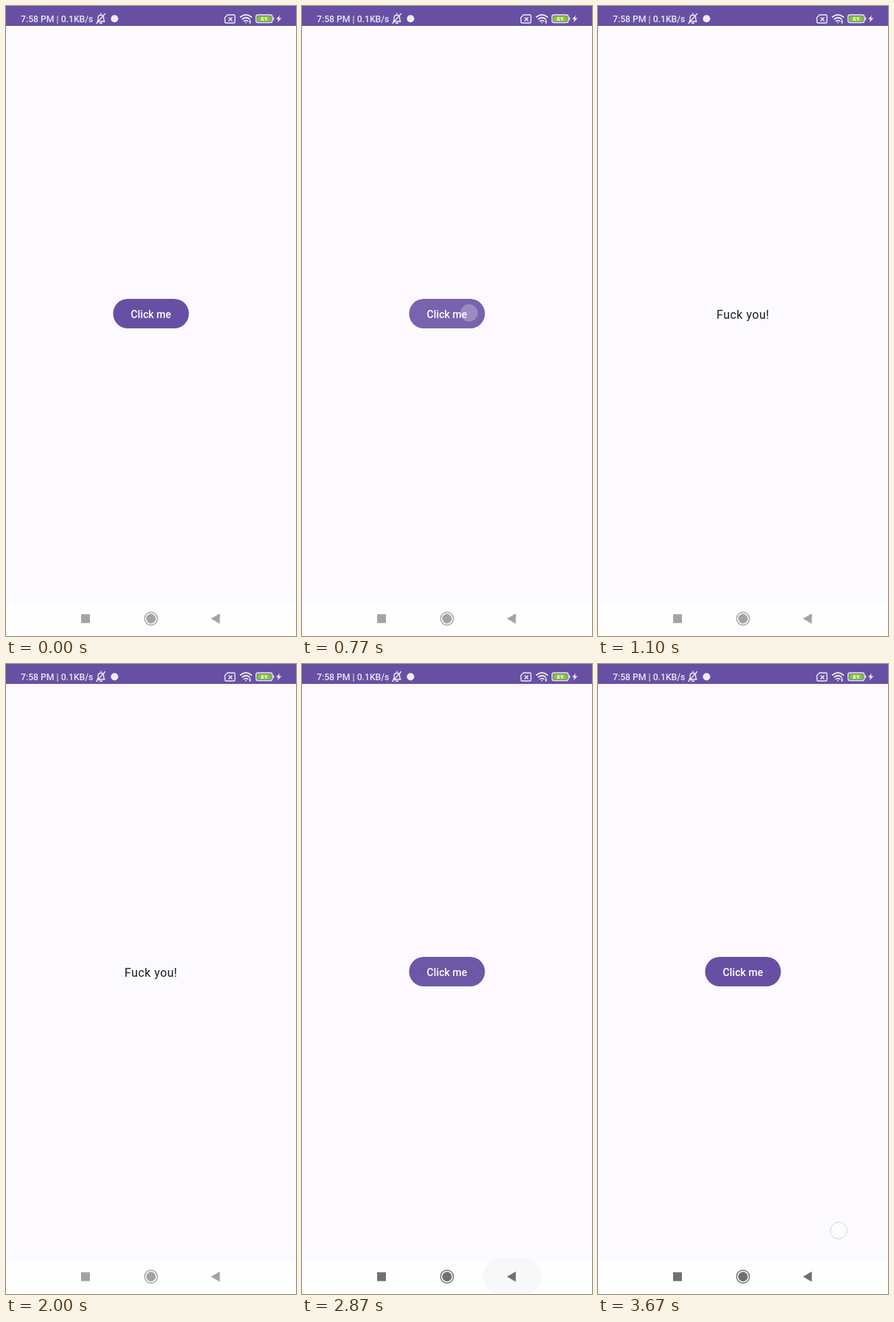
An HTML page that plays this animation: 394x854 px, repeating every 3.71 s.

```html
<!DOCTYPE html>
<html lang="en">
<head>
<meta charset="utf-8">
<style>
  html, body { margin: 0; width: 100%; height: 100%; overflow: hidden; background: #fcfafe; }
  svg { display: block; width: 394px; height: 854px; font-family: Roboto, sans-serif; }
</style>
</head>
<body>
<svg viewBox="0 0 394 854">
  <defs>
    <clipPath id="pill"><rect x="145.5" y="397" width="103" height="40" rx="20"/></clipPath>
  </defs>
  <rect width="394" height="854" fill="#fcfafe"/>
  <rect y="808" width="394" height="46" fill="#fefefe"/>

  <!-- status bar -->
  <rect width="394" height="27" fill="#6750a4"/>
  <g fill="none" stroke="#efecf6" stroke-width="1.4" stroke-linecap="round" stroke-linejoin="round">
    <text x="20" y="21.7" font-size="12.2" font-weight="500" fill="#e9e5f2" stroke="none">7:58 PM | 0.1KB/s</text>
    <path d="M124 21H134C132 19 133 17 132.5 15A3.8 3.8 0 0 0 125.2 15C125 17 126 19 124 21M127.5 23.3H130.5M129 11V10M134.5 10.5L123 23.5"/>
    <circle cx="147.5" cy="17.3" r="5" fill="#efecf6" stroke="none"/>
    <path d="M301 12H309.5Q311 12 311 13.5V21.5Q311 23 309.5 23H299Q297.5 23 297.5 21.5V15.5ZM302.8 15.8L307 20M307 15.8L302.8 20"/>
    <path d="M318.5 15Q326 8.8 333.5 15M321 17.8Q326 13.7 331 17.8M323.5 20.4Q326 18.6 328.5 20.4" stroke-width="1.7"/>
    <path d="M326 22.5V22.6M331.5 20V23" stroke-width="1.8"/>
    <rect x="339.7" y="12" width="22" height="10.5" rx="2.5"/>
    <rect x="341.3" y="13.6" width="18.8" height="7.3" rx="1" fill="#83c72f" stroke="none"/>
    <path d="M363.5 15.8V18.7"/>
    <text x="350.7" y="20.2" font-size="8" font-weight="700" text-anchor="middle" fill="#f8f8f4" stroke="none">89</text>
    <path d="M372 12.5L367 18H370L368.8 22.3L374.3 16.5H371Z" fill="#efecf6" stroke="none"/>
  </g>

  <!-- screens -->
  <g id="button" clip-path="url(#pill)">
    <rect x="145" y="397" width="104" height="40" fill="#6750a4"/>
    <circle id="ripple" cx="227" cy="416" fill="#fff"/>
    <text x="197" y="422.6" font-size="14" font-weight="500" letter-spacing=".1" text-anchor="middle" fill="#fff">Click me</text>
  </g>
  <text id="reply" x="161" y="424" font-size="16" letter-spacing=".5" fill="#1c1b1f">Fuck you!</text>

  <!-- navigation bar -->
  <rect id="backGlow" x="246" y="806" width="79.5" height="48" rx="24" fill="#eeeff2"/>
  <g id="nav">
    <rect x="102" y="824.5" width="12" height="12"/>
    <circle cx="197" cy="830.5" r="6.5"/>
    <circle cx="197" cy="830.5" r="8.7" fill="none" stroke-width="1.4" id="ring"/>
    <path d="M278.5 830.5L290.5 823.5V837.5Z"/>
  </g>
  <circle id="touch" r="11.3" fill="#fff" fill-opacity=".25" stroke="#d4d4dc"/>
</svg>
<script>
const LOOP = 3710;
const el = id => document.getElementById(id);
const set = (id, attrs) => { for (const k in attrs) el(id).setAttribute(k, attrs[k]); };
const ramp = (t, from, to) => Math.min(1, Math.max(0, (t - from) / (to - from)));
const mix = (a, b, p) => a + (b - a) * p;

// cubic-bezier(.4, 0, .2, 1)
function ease(x) {
  let lo = 0, hi = 1, s = 0.5;
  for (let i = 0; i < 20; i++) {
    s = (lo + hi) / 2;
    const bx = 1.2 * s * (1 - s) ** 2 + 0.6 * s * s * (1 - s) + s ** 3;
    if (bx < x) lo = s; else hi = s;
  }
  return s * s * (3 - 2 * s);
}

function draw(t) {
  const leave = ease(ramp(t, 780, 1080));
  const back = ease(ramp(t, 2648, 2948));
  const home = t < 2000 ? 1 - leave : back;
  set('button', { opacity: home });
  set('reply', { opacity: 1 - home });

  const press = ramp(t, 580, 780);
  set('ripple', { r: 85 * Math.sqrt(press), opacity: t < 1200 ? 0.11 * ramp(t, 570, 650) : 0 });

  set('backGlow', { opacity: ramp(t, 2500, 2600) * (1 - ramp(t, 2720, 3000)) });

  const grey = mix(163, 112, ramp(t, 2500, 2880));
  const shade = `rgb(${grey},${grey},${grey})`;
  set('nav', { fill: shade });
  set('ring', { stroke: shade });

  const tap = t >= 570 && t < 790, drag = t >= 3330;
  const move = 1 - (1 - ramp(t, 3330, 3640)) ** 2;
  set('touch', {
    cx: tap ? 227 : mix(308, 327, move),
    cy: tap ? 416 : mix(761, 768, move),
    'stroke-opacity': tap ? 0.25 : 1,
    opacity: tap || drag ? 1 : 0
  });
}

const start = performance.now();
function frame() {
  draw((performance.now() - start) % LOOP);
  requestAnimationFrame(frame);
}
frame();
</script>
</body>
</html>
```
